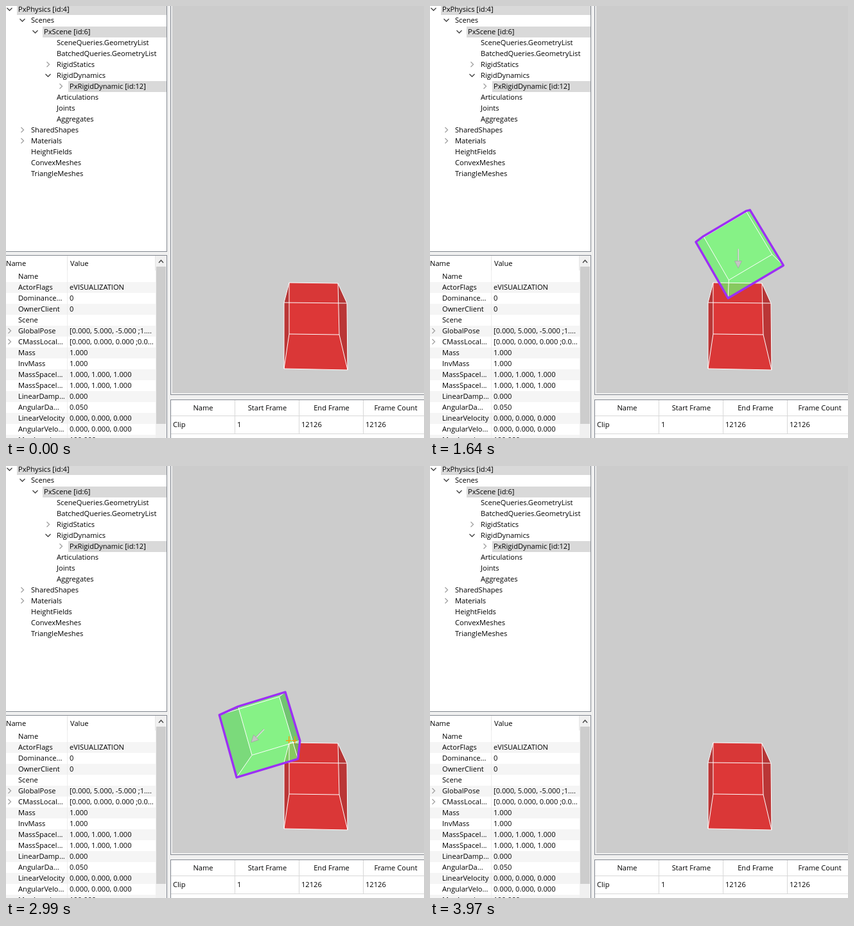
These frames come from a looping animation (651 by 673 pixels, 4510 ms). An HTML page with a canvas:

```html
<!DOCTYPE html>
<html lang="en">
<head>
<meta charset="utf-8">
<style>
  html, body { margin: 0; width: 100%; height: 100%; overflow: hidden; background: #f0f0f0; }
  svg, canvas { position: absolute; left: 0; top: 0; }
  canvas { left: 259px; }
  text { font: 11.15px "Open Sans", "Noto Sans", sans-serif; fill: #000; }
</style>
</head>
<body>
<svg id="ui" width="651" height="673"></svg>
<canvas id="view" width="392" height="603"></canvas>
<script>
// ---------- Panels ----------
let markup = '';
const rect = (x, y, w, h, fill) => markup += `<rect x="${x}" y="${y}" width="${w}" height="${h}" fill="${fill}"/>`;
const label = (x, y, s, anchor = 'start') =>
  markup += `<text x="${x}" y="${y + 4}" text-anchor="${anchor}">${s}</text>`;
const chevron = (x, y, dir) => {
  const d = { down: 'm-4-2 4 4 4-4', right: 'm-2-4 4 4-4 4', up: 'm-3.5 2 3.5-4 3.5 4' }[dir];
  markup += `<path d="M${x} ${y}${d}" fill="none" stroke="${dir === 'right' ? '#a0a0a0' : '#404040'}" stroke-width="1.3"/>`;
};

// Each entry: indent level, text, chevron, highlighted
const tree = [
  [0, 'PxPhysics [id:4]', 'down', 1], [1, 'Scenes', 'down'], [2, 'PxScene [id:6]', 'down', 1],
  [3, 'SceneQueries.GeometryList'], [3, 'BatchedQueries.GeometryList'],
  [3, 'RigidStatics', 'right'], [3, 'RigidDynamics', 'down'], [4, 'PxRigidDynamic [id:12]', 'right', 1],
  [3, 'Articulations'], [3, 'Joints'], [3, 'Aggregates'],
  [1, 'SharedShapes', 'right'], [1, 'Materials', 'right'],
  [1, 'HeightFields'], [1, 'ConvexMeshes'], [1, 'TriangleMeshes']
];
rect(0, 0, 251, 383, '#828790');
rect(0, 0, 250, 382, '#fff');
tree.forEach(([level, text, arrow, lit], i) => {
  const x = 19 + 20 * level, y = Math.round(5.4 + 17.05 * i);
  if (lit) rect(x - 2, y - 8, 252 - x, 17, '#d9d9d9');
  if (arrow) chevron(x - 13.5, y, arrow);
  label(x, y, text);
});

const unit = '1.000, 1.000, 1.000', zero = '0.000, 0.000, 0.000';
const props = [
  ['Name', ''], ['ActorFlags', 'eVISUALIZATION'], ['Dominance...', '0'], ['OwnerClient', '0'], ['Scene', ''],
  ['GlobalPose', '[0.000, 5.000, -5.000 ;1....', 1], ['CMassLocal...', '[0.000, 0.000, 0.000 ;0.0...', 1],
  ['Mass', '1.000'], ['InvMass', '1.000'], ['MassSpaceI...', unit], ['MassSpaceI...', unit],
  ['LinearDamp...', '0.000'], ['AngularDa...', '0.050'], ['LinearVelocity', zero], ['AngularVelo...', zero],
  ['MaxAngular...', '100.000']
];
rect(0, 388, 251, 285, '#828790');
rect(0, 389, 250, 284, '#fff');
label(0, 401, 'Name');
label(100, 401, 'Value');
rect(95, 389, 1, 23, '#e5e5e5');
rect(232, 389, 1, 23, '#e5e5e5');
props.forEach(([name, value, arrow], i) => {
  const y = 421 + 17 * i;
  if (i % 2) rect(0, y - 8, 233, 17, '#f5f5f5');
  if (arrow) chevron(5.5, y, 'right');
  label(19, y, name);
  label(99, y, value);
});
rect(95, 412, 1, 261, '#ededed');
rect(233, 389, 17, 284, '#f0f0f0');
rect(234, 406, 15, 245, '#cdcdcd');
chevron(241.5, 398, 'up');

rect(256, 0, 395, 606, '#828790');
rect(257, 0, 394, 605, '#f0f0f0');
rect(259, 0, 392, 603, '#ccc');

rect(256, 613, 395, 60, '#828790');
rect(257, 614, 394, 59, '#fff');
['Name', 'Start Frame', 'End Frame', 'Frame Count'].forEach((head, i) => {
  const x = 257 + 100 * i;
  label(x + 50, 626, head, 'middle');
  label(x + 3, 652, ['Clip', '1', '12126', '12126'][i]);
  if (i) rect(x - 1, 614, 1, 53, '#d8d8d8');
});
rect(257, 638, 394, 1, '#d8d8d8');
rect(257, 666, 394, 1, '#d8d8d8');
document.getElementById('ui').innerHTML = markup;

// ---------- Scene ----------
const ctx = document.getElementById('view').getContext('2d');
const LOOP = 4.51, START = 0.05, IMPACT = 0.755, END = 3.97;
const FOCAL = 360, CX = 455, CY = 301, PITCH = 0.068, YAW = 0.04, ARROW = 0.24;

// Corner bits: 1 = right, 2 = up, 4 = far
const faces = [[4, 5, 7, 6], [0, 1, 5, 4], [0, 2, 6, 4], [1, 3, 7, 5], [2, 3, 7, 6], [0, 1, 3, 2]];
const faceAxis = [2, 1, 0, 0, 1, 2];
const fixedBox = [
  [433, 565, 0], [532, 567, 0], [433, 462, 0], [531, 463, 0],
  [441, 511, 1], [519, 512, 1], [441, 431, 1], [517, 432, 1]
];

// Time, x, y, turn in degrees, hop height until the next key
const keys = [
  [IMPACT, 480, 396, 0, 5], [0.95, 480, 397, 2, 2.5], [1.08, 481, 397, 2, 22],
  [1.4, 480, 398, -10, 26], [1.75, 480, 402, -40, 41], [2.19, 479, 402, -117, 20],
  [2.5, 446, 398, -97, 8], [2.8, 418, 398, -99, 1], [2.99, 402, 410, -107, 12.7],
  [3.36, 371, 492, -167.5, 0], [3.42, 365.5, 517, -178, 8], [3.66, 336, 508, -183, 2],
  [END, 296, 508, -180, 0]
];

function pose(t) {
  if (t < IMPACT) {
    const s = t - START;
    return { x: 479.5, y: -32 + 763 * s ** 2 + 200 * s ** 4, turn: 0, tilt: 0.07 };
  }
  let i = 0;
  while (i < keys.length - 2 && t >= keys[i + 1][0]) i++;
  const a = keys[i], b = keys[i + 1], u = (t - a[0]) / (b[0] - a[0]);
  const mix = n => a[n] + (b[n] - a[n]) * u;
  return { x: mix(1), y: mix(2) - 4 * a[4] * u * (1 - u), turn: mix(3), tilt: 0 };
}

function project({ x, y, turn, tilt }) {
  const depth = 4.13 + 0.0008 * Math.max(0, 364 - y);
  const a = -turn * Math.PI / 180, p = PITCH + tilt;
  const c = Math.cos(a), s = Math.sin(a), cp = Math.cos(p), sp = Math.sin(p);
  return fixedBox.map((_, i) => {
    const lx = (i & 1) - 0.5, ly = (i >> 1 & 1) - 0.5, lz = (i >> 2) - 0.5;
    const rx = lx * c - ly * s, ry = lx * s + ly * c;
    const z = depth + lz * cp + ry * sp - YAW * rx;
    const px = (x - CX) / FOCAL * depth + rx + YAW * lz;
    const py = (CY - y) / FOCAL * depth + ry * cp - lz * sp;
    return [CX + FOCAL * px / z, CY - FOCAL * py / z, z];
  });
}

function trace(points) {
  ctx.beginPath();
  points.forEach(([x, y]) => ctx.lineTo(x, y));
  ctx.closePath();
}

function fillBox(pts, rgb, turn) {
  const a = turn * Math.PI / 180;
  const sideways = [Math.abs(Math.cos(a)), Math.abs(Math.sin(a)), 0];
  faces
    .map((f, i) => ({ f, axis: faceAxis[i], z: f.reduce((sum, n) => sum + pts[n][2], 0) }))
    .sort((p, q) => q.z - p.z)
    .forEach(({ f, axis }) => {
      const shade = (axis === 2 ? 1 : 0.95) - 0.55 * sideways[axis] ** 12;
      ctx.fillStyle = `rgba(${rgb.map(v => v * shade)},0.5)`;
      trace(f.map(n => pts[n]));
      ctx.fill();
    });
}

function strokeBox(pts) {
  ctx.strokeStyle = '#fff';
  ctx.lineWidth = 1;
  ctx.beginPath();
  pts.forEach((p, i) => [1, 2, 4].forEach(bit => {
    if (i & bit) return;
    ctx.moveTo(p[0], p[1]);
    ctx.lineTo(pts[i | bit][0], pts[i | bit][1]);
  }));
  ctx.stroke();
}

function hull(pts) {
  const sorted = [...pts].sort((a, b) => a[0] - b[0] || a[1] - b[1]);
  const half = list => {
    const out = [];
    for (const p of list) {
      while (out.length > 1) {
        const [a, b] = out.slice(-2);
        if ((b[0] - a[0]) * (p[1] - a[1]) > (b[1] - a[1]) * (p[0] - a[0])) break;
        out.pop();
      }
      out.push(p);
    }
    return out.slice(0, -1);
  };
  return [...half(sorted), ...half(sorted.reverse())];
}

function drawArrow(from, t) {
  const next = pose(t + 0.001);
  const vx = (next.x - from.x) * 1000 * ARROW, vy = (next.y - from.y) * 1000 * ARROW;
  const len = Math.max(13, Math.hypot(vx, vy));
  ctx.save();
  ctx.translate(from.x, from.y);
  ctx.rotate(Math.atan2(vy, vx));
  ctx.fillStyle = '#dcdcdc';
  ctx.fillRect(0, -1, len - 11, 1.5);
  ctx.fillStyle = '#a8a8a8';
  ctx.fillRect(0, 0.5, len - 11, 0.7);
  if (len > 100) {
    ctx.strokeStyle = '#999';
    ctx.lineWidth = 0.8;
    ctx.strokeRect(len - 28, -1.5, 18, 3);
  }
  trace([[len, 0], [len - 11, -5.5], [len - 11, 5.5]]);
  ctx.fillStyle = '#c4c4c4';
  ctx.fill();
  ctx.strokeStyle = '#a0a0a0';
  ctx.lineWidth = 0.7;
  ctx.stroke();
  ctx.restore();
}

function drawContacts() {
  ctx.fillStyle = '#f0a010';
  [441, 450].forEach(x => {
    ctx.fillRect(x - 1, 421, 1.5, 11);
    ctx.fillRect(x - 5, 427, 8, 1.5);
  });
}

function draw(now) {
  const t = now / 1000 % LOOP;
  ctx.setTransform(1, 0, 0, 1, -259, 0);
  ctx.fillStyle = '#ccc';
  ctx.fillRect(259, 0, 392, 603);
  fillBox(fixedBox, [228, 7, 7], 0);
  if (t < START || t >= END) {
    strokeBox(fixedBox);
  } else {
    const body = pose(t), pts = project(body);
    fillBox(pts, [112, 255, 112], body.turn);
    strokeBox(fixedBox);
    strokeBox(pts);
    drawArrow(body, t);
    trace(hull(pts));
    ctx.strokeStyle = '#9d2ff5';
    ctx.lineWidth = 3.4;
    ctx.lineJoin = 'round';
    ctx.stroke();
    if (t > 2.94 && t < 3.04) drawContacts();
  }
  requestAnimationFrame(draw);
}
requestAnimationFrame(draw);
</script>
</body>
</html>
```
